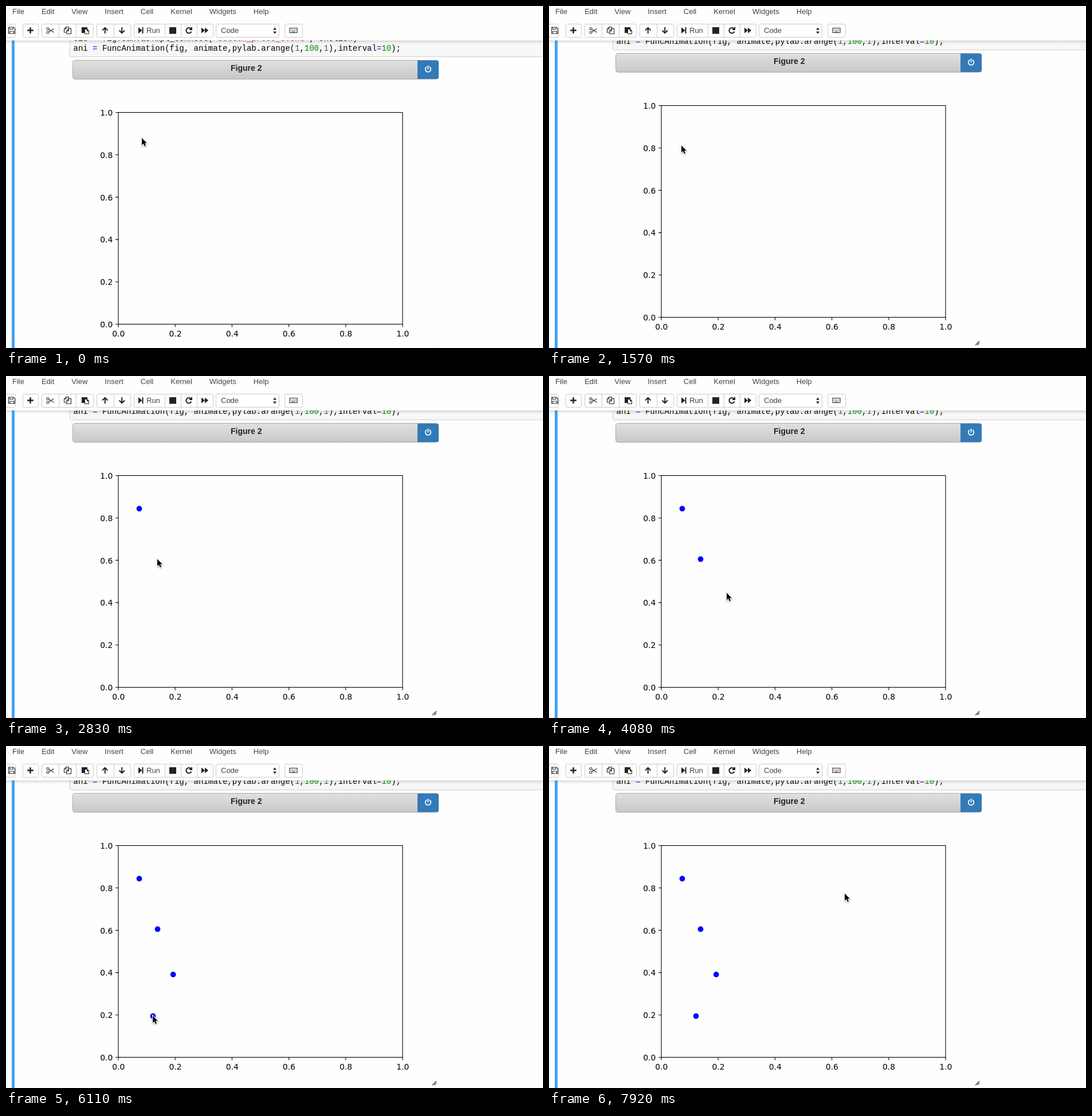
Recreate the animation shown at these times as an HTML page. Size 937x596 px, loop 8 s.

```html
<!DOCTYPE html>
<html lang="en">
<head>
<meta charset="utf-8">
<title>Notebook figure</title>
<style>
  html, body { margin: 0; width: 100%; height: 100%; overflow: hidden; background: #fefefe; }
  svg { display: block; }
  text { white-space: pre; }
  .ui { font: 13px "Liberation Sans", Arial, sans-serif; fill: #444; }
  .title { font: bold 14px "Liberation Sans", Arial, sans-serif; fill: #222; text-anchor: middle; }
  .code { font: 14px "Liberation Mono", "Courier New", monospace; fill: #000; }
  .op { fill: #a2f; font-weight: bold; }
  .num { fill: #080; }
  .str { fill: #ba2121; }
  .tick { font: 13.89px "DejaVu Sans", sans-serif; fill: #000; stroke: none; }
  .box { fill: #fff; stroke: #ccc; }
  .solid { fill: #222; fill-rule: evenodd; }
  .thin { fill: none; stroke: #333; stroke-width: 1.2; }
  .bold { fill: none; stroke: #222; stroke-width: 2; }
  #cursor { filter: drop-shadow(0 1px 1px rgba(0, 0, 0, .35)); }
</style>
</head>
<body>
<svg width="937" height="596" viewBox="0 0 937 596">
  <defs>
    <linearGradient id="bar" x2="0" y2="1">
      <stop stop-color="#e0e0e0"/><stop offset="1" stop-color="#c8c8c8"/>
    </linearGradient>
    <linearGradient id="shade" x2="0" y2="1">
      <stop stop-color="#575757" stop-opacity=".2"/><stop offset="1" stop-color="#575757" stop-opacity="0"/>
    </linearGradient>
  </defs>
  <rect width="937" height="596" fill="#fefefe"/>
  <rect x="10" y="58" width="5" height="538" fill="#42a5f5"/>

  <g id="page">
    <rect x="111.5" y="20.5" width="840" height="68" rx="2" fill="#f7f7f7" stroke="#cfcfcf"/>
    <text class="code" x="117.5" y="61">cid <tspan class="op">=</tspan> fig<tspan class="op">.</tspan>canvas<tspan class="op">.</tspan>mpl_connect(<tspan class="str">'button_press_event'</tspan>, onclick)</text>
    <text class="code" x="117.5" y="78">ani <tspan class="op">=</tspan> FuncAnimation(fig, animate,pylab.arange(<tspan class="num">1</tspan>,<tspan class="num">100</tspan>,<tspan class="num">1</tspan>),interval<tspan class="op">=</tspan><tspan class="num">10</tspan>);</text>
    <rect x="116.5" y="94.5" width="638" height="33" rx="4" fill="url(#bar)" stroke="#aaa"/>
    <text class="title" x="419.3" y="113">Figure 2</text>
    <path d="M718 95h34a3 3 0 0 1 3 3v26a3 3 0 0 1-3 3h-34z" fill="#337ab7"/>
    <path d="M733.7 106.3a4.8 4.8 0 1 0 5.6 0M736.5 104.3v5.7" fill="none" stroke="#fff" stroke-width="1.7" stroke-linecap="round"/>
    <g id="axes" stroke="#000" stroke-width="1.1" fill="none"></g>
    <path d="M744 603l7-7M747 603l4-4" stroke="#444" stroke-width="1.4"/>
  </g>
  <g id="dots" fill="#00f"></g>

  <rect width="937" height="60" fill="#fefefe"/>
  <rect y="60" width="937" height="6" fill="url(#shade)"/>
  <text id="menu" class="ui" x="-19" y="14"></text>
  <g id="toolbar"></g>
  <text class="ui" x="245" y="47">Run</text>
  <text class="ui" x="375" y="47">Code</text>

  <path id="cursor" d="M0 0V12.4L2.9 9.7 4.9 14.4 7 13.5 5 8.9H8.9Z" stroke="#fff" stroke-width="2" paint-order="stroke"/>
</svg>
<script>
const LOOP = 8000, SCROLL_AT = 1570, FRAME = 100;
const $ = id => document.getElementById(id);
const add = (parent, tag, attrs, text = '') => {
  const el = document.createElementNS('http://www.w3.org/2000/svg', tag);
  for (const k in attrs) el.setAttribute(k, attrs[k]);
  el.textContent = text;
  return parent.appendChild(el);
};

for (const name of 'File Edit View Insert Cell Kernel Widgets Help'.split(' ')) add($('menu'), 'tspan', { dx: 30 }, name);

// Icons are drawn around the centre of their button.
const keys = 'h1m1 0'.repeat(5);
const icons = {
  save: ['thin', 'M1.5-5.5H10L12.5-3V5.5H1.5zM3.5-5.5V-2H9V-5.5M3.5 5.5V1.5H10.5V5.5'],
  plus: ['solid', 'M-1.3-5.3h2.6v4h4v2.6h-4v4h-2.6v-4h-4v-2.6h4z'],
  cut: ['thin', 'M-6-3a2 2 0 1 0 4 0a2 2 0 1 0-4 0M-6 3.5a2 2 0 1 0 4 0a2 2 0 1 0-4 0M-2.2-1.8L6.5 3.5M-2.2 2.3L6.5-3'],
  copy: ['thin', 'M-1.2 3.5H-5.500V-2.500L-2-6H2.500V-3.200M-2-6V-2.500H-5.500M-1.200 6V1L2.300-3.200H6.500V6zM2.300-3.200V1H-1.200'],
  paste: ['solid', 'M-5-5.500H5V-2.500L8 .500V6.500H0V4.500H-5ZM1-1.500H4V1.500H7V5.500H1Z'],
  up: ['bold', 'M0 5.5V-4.500M-4.700 0L0-4.700 4.700 0'],
  down: ['bold', 'M0-5.500V4.500M-4.700 0L0 4.700 4.700 0'],
  run: ['solid', 'M-19-5.500l6.500 5.500-6.500 5.500zM-12.500-5.500h2v11h-2z'],
  stop: ['solid', 'M-6-5.500H6V6H-6z'],
  redo: ['bold', 'M3.800-2.700A4.700 4.700 0 1 0 4.400 2M5-5.500V-1.500H1'],
  forward: ['solid', 'M-6-5l6 5-6 5zM0-5l6 5-6 5z'],
  select: ['solid', 'M45-1l3-4 3 4zM45 2l3 4 3-4z'],
  keyboard: ['thin', `M-6.500-4H6.500V4H-6.500zM-4.500-1.500${keys}M-4.500.500${keys}M-3 2.500h6`],
};

function buttonGroup(x, width, names) {
  const list = names.split(' ');
  add($('toolbar'), 'rect', { class: 'box', x: x + .5, y: 31.5, width: width * list.length, height: 23, rx: 2 });
  list.forEach((name, i) => {
    const left = x + i * width, [style, d] = icons[name];
    if (i) add($('toolbar'), 'path', { class: 'box', d: `M${Math.round(left) + .5} 31.5v23` });
    add($('toolbar'), 'path', { class: style, d, transform: `translate(${left + width / 2} 42.5)` });
  });
}
buttonGroup(-10, 26, 'save');
buttonGroup(29, 27, 'plus');
buttonGroup(62, 30, 'cut copy paste');
buttonGroup(158, 29.5, 'up down');
buttonGroup(223, 54, 'run');
buttonGroup(277, 28, 'stop redo forward');
buttonGroup(366, 110, 'select');
buttonGroup(486, 31, 'keyboard');

const plot = { left: 196, top: 185.5, width: 496, height: 369 };
const bottom = plot.top + plot.height;
add($('axes'), 'rect', { x: plot.left, y: plot.top, width: plot.width, height: plot.height });
for (let i = 0; i <= 5; i++) {
  const x = plot.left + plot.width * i / 5, y = bottom - plot.height * i / 5, label = (i / 5).toFixed(1);
  add($('axes'), 'path', { d: `M${x} ${bottom}v4.9M${plot.left} ${y}h-4.9` });
  add($('axes'), 'text', { class: 'tick', x: x + .3, y: 576, 'text-anchor': 'middle' }, label);
  add($('axes'), 'text', { class: 'tick', x: 186.3, y: y + 5.4, 'text-anchor': 'end' }, label);
}

// Each pointer move is a quadratic curve from where the last one ended.
const move = (start, end, to, bend) => ({ start, end, to, bend });
const home = [237, 230];
const moves = [
  move(80, 320, [235, 229], [231, 227]),
  move(740, 1240, [231, 243]),
  move(1810, 2030, [232.5, 231], [226, 225]),
  move(2260, 2830, [264.5, 319], [242, 288]),
  move(3690, 4080, [310, 378]),
  move(4200, 4480, [291.7, 398], [348, 392]),
  move(4960, 5100, [326, 432]),
  move(5220, 5660, [256.5, 470.5], [295, 478]),
  move(6200, 6870, [510, 356], [148, 555]),
  move(6990, 7310, [551, 261], [545, 300]),
  move(7510, 7920, [516, 257], [530, 249]),
];

// The screen refreshes about every FRAME ms, so a move advances in equal steps.
function progress({ start, end }, t) {
  const gaps = Math.round((end - start) / FRAME);
  const done = Math.floor((t - start) / (end - start) * gaps + 1e-6) + 1;
  return Math.min(1, done / (gaps + 1));
}

function pointerAt(t) {
  const i = moves.findLastIndex(m => m.start <= t);
  if (i < 0) return home;
  const from = i ? moves[i - 1].to : home, { to, bend } = moves[i], k = progress(moves[i], t);
  return from.map((a, axis) => {
    const c = bend ? bend[axis] : (a + to[axis]) / 2;
    return (1 - k) ** 2 * a + 2 * k * (1 - k) * c + k * k * to[axis];
  });
}

// Every click leaves a dot under the pointer.
const dots = [2140, 3520, 4840, 6110].map(at => {
  const [cx, cy] = pointerAt(at);
  return { at, el: add($('dots'), 'circle', { cx, cy: cy + .2, r: 4.85 }) };
});

function render(t) {
  const [x, y] = pointerAt(t).map(Math.floor);
  $('cursor').setAttribute('transform', `translate(${x} ${y})`);
  $('page').setAttribute('transform', `translate(0 ${t < SCROLL_AT ? 0 : -12})`);
  for (const { at, el } of dots) el.setAttribute('visibility', t < at ? 'hidden' : 'visible');
}

const begin = performance.now();
function tick() {
  render((performance.now() - begin) % LOOP);
  requestAnimationFrame(tick);
}
tick();
</script>
</body>
</html>
```
